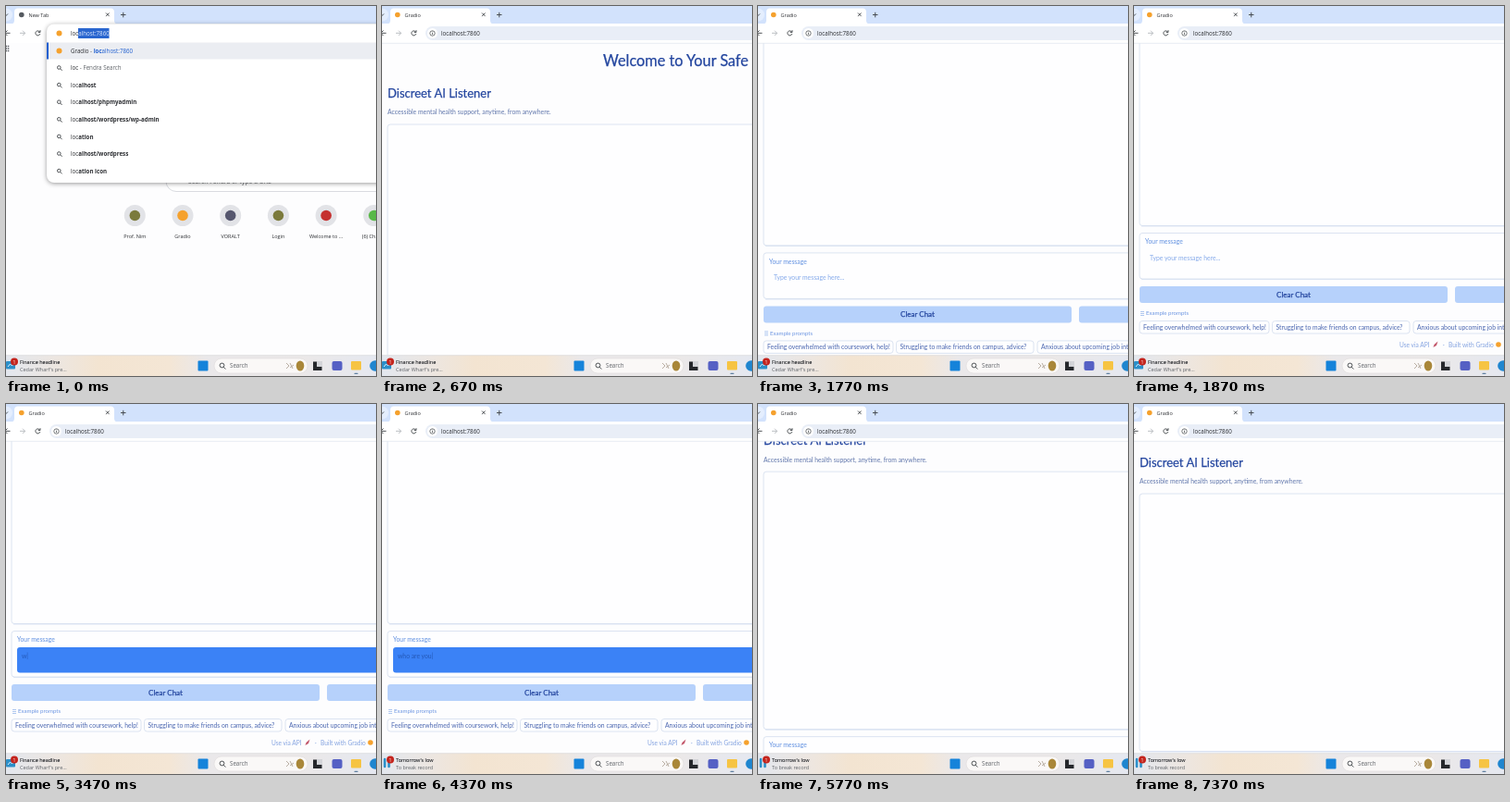
An HTML page that plays this animation: 400 px wide and 400 px high, repeating every 8 s.

```html
<!DOCTYPE html>
<html lang="en">
<head>
<meta charset="utf-8">
<title>Local chat demo</title>
<style>
html, body { margin: 0; width: 100%; height: 100%; overflow: hidden; background: #fdfdfe; }
svg { display: block; width: 100%; height: 100%; }
text { white-space: pre; font: 6.2px "Open Sans", "Noto Sans", sans-serif; fill: #2b2d31; }
.small { font-size: 5.5px; }
.mid { text-anchor: middle; }
.b { font-weight: 700; }
.grey { fill: #5f6368; }
.blue { fill: #1f5fd0; }
#page text { font: 6.8px Lato, "Open Sans", sans-serif; fill: #4a66b0; }
#page .h { fill: #24469f; stroke: #24469f; stroke-width: .25; }
#page .sub { fill: #6076ab; }
#page .foot { font-size: 6.6px; fill: #84a3e0; }
.line { fill: none; stroke: #3c4043; stroke-width: .9; }
.card { fill: #fefeff; stroke: #d3ddee; stroke-width: .8; }
.drop { filter: drop-shadow(0 1px 2.5px rgba(0, 0, 0, .4)); }
</style>
</head>
<body>
<svg viewBox="0 0 400 400">
  <rect width="400" height="400" fill="#fdfdfe"/>

  <g id="page">
    <text class="h" x="239" y="64.7" style="font-size:16.3px">Welcome to Your Safe Space</text>
    <text class="h" x="6" y="99" style="font-size:13px">Discreet AI Listener</text>
    <text class="sub" x="6" y="117.4" style="font-size:6.85px">Accessible mental health support, anytime, from anywhere.</text>
    <rect class="card" x="6" y="128" width="420" height="278.5" rx="3"/>
    <path d="M8 407H400" stroke="#d5dff0" stroke-width=".8"/>

    <rect class="card" x="6" y="414.5" width="420" height="49.5" rx="3"/>
    <path d="M8 464.6H400" stroke="#d5dff0" stroke-width=".8"/>
    <text x="12" y="426.3" style="fill:#5f8fe0">Your message</text>
    <rect id="focus" x="12" y="432" width="420" height="27.5" rx="3" fill="#3b82f6"/>
    <text id="msg" x="17" y="443.5"></text>

    <g fill="#b6d1fb">
      <rect x="6" y="472" width="333" height="18" rx="3"/>
      <rect x="347" y="472" width="80" height="18" rx="3"/>
    </g>
    <text class="h mid" x="172.5" y="483.7" style="font-size:8px">Clear Chat</text>
    <path d="M7 499.5h4M7 501.5h4M7 503.5h4" stroke="#8fb0ea" stroke-width=".7"/>
    <text x="13" y="503.3" style="font-size:6.05px;fill:#6d96e2">Example prompts</text>
    <g id="prompts"></g>
    <text class="foot" x="287" y="537.5">Use via API</text>
    <path d="M323.5 538l1-3 4-3.5-1.5 4.5z" fill="#c2566a"/>
    <text class="foot" x="334" y="537.5">·</text>
    <text class="foot" x="340" y="537.5">Built with Gradio</text>
    <circle cx="394" cy="535" r="2.8" fill="#f5a12d"/>
  </g>

  <g id="tabs">
    <rect width="400" height="19" fill="#d2e2fc"/>
    <circle cx="0" cy="9.5" r="7" fill="#e4eefe"/>
    <path class="line" d="M-2 8.500l2 2 2-2"/>
    <path d="M5 19.500q4 0 4-4V6.500q0-4 4-4H113q4 0 4 4v9q0 4 4 4z" fill="#fff"/>
    <rect y="19" width="400" height="21" fill="#fff"/>
    <circle id="favicon" cx="16.8" cy="9.5" r="2.8"/>
    <text id="title" class="small" x="24.5" y="11.5"></text>
    <path class="line" d="M108 7.500l3.600 3.600M111.600 7.500l-3.600 3.600M124 9.500h5.500M126.750 6.800v5.500"/>
    <path class="line" d="M4.500 29.300h-6M1.500 26.500l-2.800 2.800 2.800 2.800"/>
    <path class="line" d="M15 29.300h5.500M18 26.700l2.600 2.600-2.600 2.600" style="stroke:#b4b7bb"/>
    <path class="line" d="M36.600 28.200a2.500 2.500 0 1 0 .2 1.900M37 26.200v2.200h-2.200"/>
  </g>

  <g id="url">
    <path d="M0 40.300H400" stroke="#e3e7ef" stroke-width=".8"/>
    <rect x="47" y="22" width="380" height="15" rx="7.5" fill="#e9eef7"/>
    <circle cx="54.5" cy="29.5" r="5.5" fill="#fff"/>
    <circle class="line" cx="54.5" cy="29.5" r="2.7" style="stroke-width:.7"/>
    <path class="line" d="M54.500 29v2M54.500 27.700v.7" style="stroke-width:.7"/>
    <text x="64" y="31.7">localhost:7860</text>
  </g>

  <g id="start">
    <path d="M0 43.500h4M0 46h4M0 48.500h4" stroke="#5f6368" stroke-width="1.3" stroke-dasharray="1.3 .7"/>
    <rect x="173" y="178" width="260" height="22.5" rx="11" fill="#fff" stroke="#d9dbe0"/>
    <text class="grey" x="197" y="191.5" style="font-size:6.8px">Search Fendra or type a URL</text>
    <g id="shortcuts"></g>
    <rect class="drop" x="44" y="19.5" width="400" height="171.5" rx="8" fill="#fff"/>
    <circle cx="57.5" cy="29.5" r="3" fill="#f5a12d"/>
    <rect x="78" y="24" width="33.5" height="11" fill="#2a66cf"/>
    <text x="70" y="31.7">loc<tspan fill="#dfeaff">alhost:7860</tspan></text>
    <rect x="44" y="39.5" width="360" height="18" fill="#ebedf2"/>
    <rect x="44" y="39.5" width="2" height="18" fill="#1f5fd0"/>
    <circle cx="57.5" cy="48.5" r="3" fill="#f5a12d"/>
    <text x="70" y="50.7">Gradio<tspan class="grey"> - </tspan><tspan class="blue b">loc</tspan><tspan class="blue">alhost:7860</tspan></text>
    <g id="hints"></g>
  </g>

  <g id="taskbar">
    <defs>
      <linearGradient id="wall">
        <stop offset="0" stop-color="#e3e7ee"/><stop offset=".14" stop-color="#ede6e0"/>
        <stop offset=".25" stop-color="#f3e4d1"/><stop offset=".44" stop-color="#f4e6d5"/>
        <stop offset=".54" stop-color="#eae8ea"/><stop offset=".8" stop-color="#ebe8e8"/>
        <stop offset="1" stop-color="#e5e8f0"/>
      </linearGradient>
    </defs>
    <rect y="377.5" width="400" height="22.5" fill="url(#wall)"/>
    <path d="M0 377.700H400" stroke="#d6d5d8" stroke-width=".6"/>
    <g id="chart">
      <rect x="0" y="384" width="10" height="8.5" rx="1" fill="#2b8fc9"/>
      <path d="M2 390l2.500-3 2 2 2-2" stroke="#d8effb" fill="none"/>
    </g>
    <path id="gauge" d="M3 384v8M7.500 387v5" stroke="#2b8fc9" stroke-width="2.6" stroke-linecap="round"/>
    <circle cx="9" cy="384.5" r="4" fill="#c4241d"/>
    <text class="mid" x="9" y="386.5" style="font-size:5px;fill:#fff">1</text>
    <text id="news1" class="small" x="15" y="387" stroke="#2b2d31" stroke-width=".12"></text>
    <text id="news2" class="small grey" x="15" y="394.5"></text>
    <rect x="207.5" y="383.5" width="11" height="11" rx="1" fill="#1583da"/>
    <rect x="225" y="381" width="101" height="16" rx="8" fill="#faf8f7" stroke="#dedadb" stroke-width=".6"/>
    <circle class="line" cx="233.5" cy="388.5" r="2.4"/>
    <path class="line" d="M235.200 390.300l2.200 2.200"/>
    <text class="grey" x="242" y="391.3">Search</text>
    <path d="M303 386l3 3-3 3M307 386l3 6M307 391l4-3" stroke="#a79b8c" stroke-width=".8" fill="none"/>
    <ellipse cx="318" cy="389" rx="4.3" ry="5.5" fill="#a98739"/>
    <rect x="332" y="384.5" width="9.5" height="9.5" fill="#25272b"/>
    <rect x="336" y="384" width="6" height="6" fill="#d3d4d8"/>
    <rect x="352.5" y="384" width="11" height="10" rx="2" fill="#5560c4"/>
    <rect x="373" y="384" width="11" height="9.5" rx="1" fill="#f6c443"/>
    <rect x="376.5" y="396.8" width="4" height="1.1" rx=".5" fill="#5f7f9f"/>
    <circle cx="399" cy="389" r="5.8" fill="#1f86cf"/>
  </g>
</svg>
<script>
const $ = id => document.getElementById(id);
const show = (id, on) => $(id).setAttribute('display', on ? 'inline' : 'none');

$('prompts').innerHTML = [
  [6, 140, 'Feeling overwhelmed with coursework, help!'],
  [149.5, 148.5, 'Struggling to make friends on campus, advice?'],
  [302, 160, 'Anxious about upcoming job interviews, tips?']
].map(([x, w, s]) => `<rect class="card" x="${x}" y="509.5" width="${w}" height="13.5" rx="3"/>
  <text x="${x + 4}" y="518.5">${s}</text>`).join('');

$('hints').innerHTML = ['', 'alhost', 'alhost/phpmyadmin', 'alhost/wordpress/wp-admin',
  'ation', 'alhost/wordpress', 'ation icon'].map((s, i) => {
  const y = 67 + i * 18.6;
  const rest = s ? `<tspan class="b">${s}</tspan>` : '<tspan class="grey"> - Fendra Search</tspan>';
  return `<circle class="line" cx="57.3" cy="${y - .5}" r="1.8"/>
    <path class="line" d="M58.6 ${y + .8}l2 2"/><text x="70" y="${y + 2.1}">loc${rest}</text>`;
}).join('');

$('shortcuts').innerHTML = [
  ['Prof. Nim', '#7b7a3c'], ['Gradio', '#f5a12d'], ['VORALT', '#55566e'],
  ['Login', '#7b7a3c'], ['Welcome to ...', '#c5302f'], ['(6) Chatt...', '#58b847']
].map(([s, c], i) => {
  const x = 139.3 + i * 51.7;
  return `<circle cx="${x}" cy="226.5" r="11.5" fill="#e2e3e7"/>
    <circle cx="${x}" cy="226.5" r="5.8" fill="${c}"/>
    <text class="small mid" x="${x}" y="251">${s}</text>`;
}).join('');

const LOOP = 8000, MESSAGE = 'who are you?';
// time, scroll offset
const SCROLL = [[1610, 0], [1860, 169], [5200, 169], [5770, 55], [6100, 31]];

function scrollAt(t) {
  if (t <= SCROLL[0][0]) return 0;
  for (let i = 1; i < SCROLL.length; i++) {
    const [t0, y0] = SCROLL[i - 1], [t1, y1] = SCROLL[i];
    if (t < t1) {
      const p = (t - t0) / (t1 - t0);
      return y0 + (y1 - y0) * p * (2 - p);
    }
  }
  return SCROLL[SCROLL.length - 1][1];
}

function draw(t) {
  const opened = t >= 300;
  show('start', !opened);
  show('url', opened);
  show('page', t >= 600);
  $('title').textContent = opened ? 'Gradio' : 'New Tab';
  $('favicon').setAttribute('fill', opened ? '#f5a12d' : '#555a60');
  $('page').setAttribute('transform', `translate(0 ${-scrollAt(t)})`);

  const focused = t >= 2900 && t < 4880;
  const typed = MESSAGE.slice(0, Math.max(0, Math.floor((t - 3350) / 90)));
  show('focus', focused);
  $('msg').textContent = (typed || (focused ? '' : 'Type your message here...')) + (focused ? '|' : '');
  $('msg').style.fill = focused ? '#2459b8' : typed ? '#3f5f9f' : '#84a9ea';

  const later = t >= 3800;
  show('chart', !later);
  show('gauge', later);
  $('news1').textContent = later ? "Tomorrow's low" : 'Finance headline';
  $('news2').textContent = later ? 'To break record' : "Cedar Wharf's pre...";
}

const begin = performance.now();
function tick() {
  draw((performance.now() - begin) % LOOP);
  requestAnimationFrame(tick);
}
tick();
</script>
</body>
</html>
```
